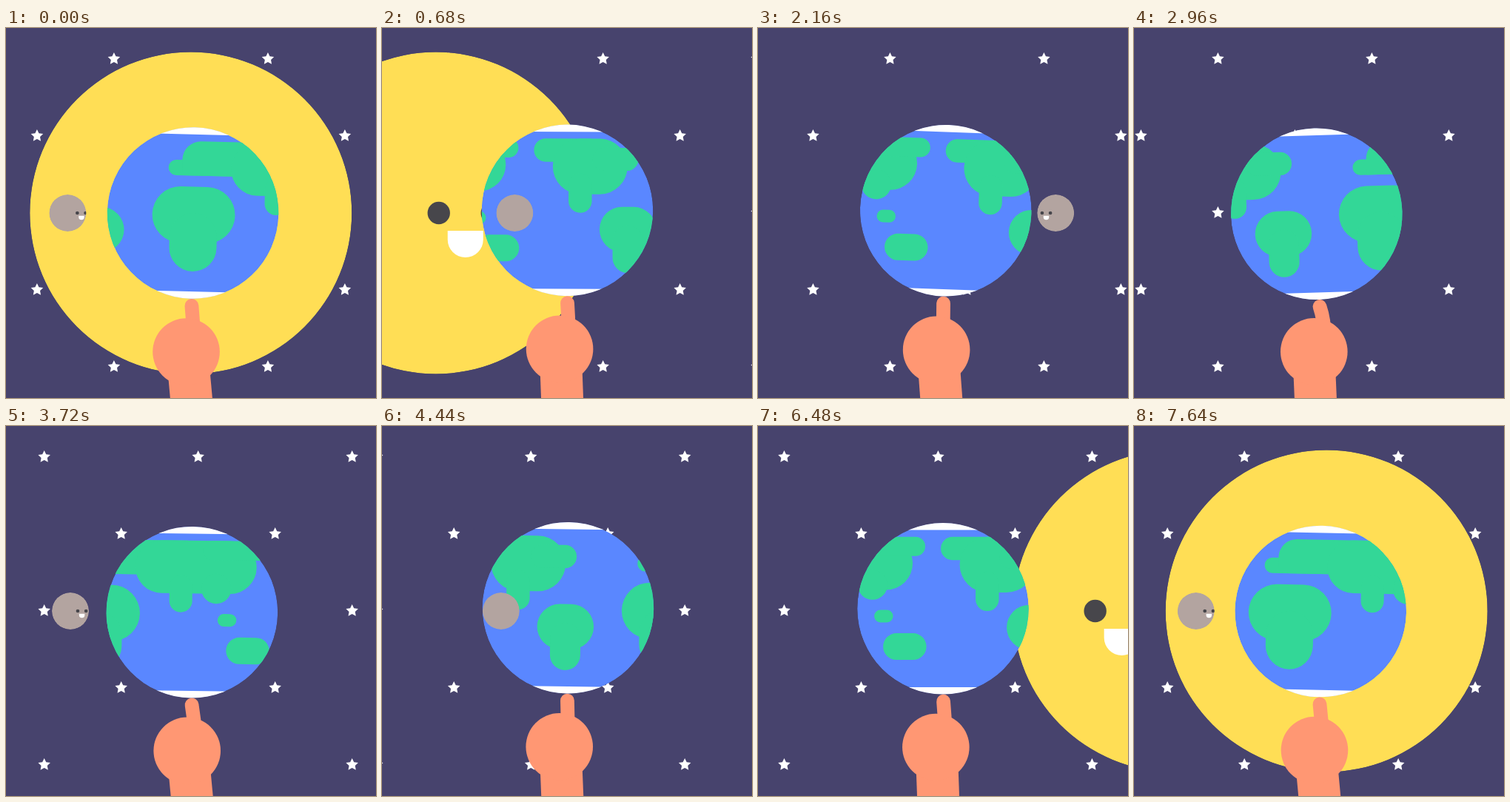
Recreate the animation shown at these times as an HTML page. Size 500 by 500 pixels, loop 7680 ms.

```html
<!DOCTYPE html>
<html lang="en">
<head>
<meta charset="utf-8">
<title>Spinning globe</title>
<style>
  html, body { margin: 0; width: 100%; height: 100%; overflow: hidden; background: #47436d; }
  svg { display: block; width: 100vw; height: 100vh; }
  .skin { fill: #ff9773; }
  .finger { fill: none; stroke: #ff9773; stroke-width: 18.8; stroke-linecap: round; }
</style>
</head>
<body>
<svg viewBox="0 0 500 500">
  <defs>
    <clipPath id="sunClip"><circle r="217.5"/></clipPath>
    <clipPath id="moonClip"><circle r="25"/></clipPath>
    <clipPath id="earthClip"><circle r="115.8"/></clipPath>

    <g id="face">
      <circle cx="-36" r="15.2" fill="#47464b"/>
      <circle cx="36" r="15.2" fill="#47464b"/>
      <path d="M-24 24h48v12a24 24 0 0 1-48 0z" fill="#fff"/>
    </g>

    <g id="land" fill="#33d797">
      <!-- Africa -->
      <rect x="-56" y="-35.5" width="112" height="76" rx="38"/>
      <rect x="-32" y="0" width="64" height="79" rx="32"/>
      <!-- South America -->
      <rect x="-170" y="-5" width="76.5" height="61" rx="30.5"/>
      <rect x="-152.2" y="20" width="41" height="64.3" rx="20.5"/>
      <!-- North America -->
      <rect x="-259" y="-97" width="90" height="31.4" rx="15.7"/>
      <rect x="-233.5" y="-97" width="101" height="75.2" rx="37.6"/>
      <rect x="-180" y="-84.8" width="62.3" height="31.2" rx="15.6"/>
      <rect x="-212" y="-50" width="31.5" height="53.3" rx="15.7"/>
      <!-- Eurasia -->
      <rect x="-35.5" y="-71.5" width="110" height="21" rx="10.5"/>
      <path d="M-17 -60V-72a25 25 0 0 1 25-25H120V-50.5H-17z"/>
      <rect x="49" y="-97" width="164" height="71.6" rx="35.8"/>
      <rect x="140" y="-97" width="90" height="26" rx="13"/>
      <rect x="95.5" y="-50" width="31" height="50.2" rx="15.5"/>
      <circle cx="158.8" cy="-32.2" r="20.2"/>
      <!-- Oceania -->
      <rect x="173" y="33.3" width="58.5" height="36" rx="18"/>
      <rect x="161" y="1.8" width="25.5" height="17" rx="8.5"/>
    </g>
  </defs>

  <rect width="500" height="500" fill="#47436d"/>
  <g id="stars" fill="#fff"></g>

  <g id="sun" clip-path="url(#sunClip)">
    <circle r="217.5" fill="#ffde55"/>
    <use id="sunFace" href="#face"/>
  </g>

  <g id="earth" clip-path="url(#earthClip)">
    <circle r="115.8" fill="#5a87ff"/>
    <g id="spin">
      <use href="#land"/>
      <use href="#land" x="-510"/>
    </g>
    <path d="M-120 -120h240v13.8h-240zM-120 106.2h240v13.8h-240z" fill="#fff"/>
  </g>

  <g id="moon" clip-path="url(#moonClip)">
    <circle r="25" fill="#b3a4a0"/>
    <use id="moonFace" href="#face"/>
  </g>

  <path id="arm" class="skin"/>
  <path id="finger" class="finger"/>
  <circle id="palm" class="skin" r="45.3"/>
</svg>

<script>
const LOOP = 7680, BOB = 1920, ORBIT = 3840, DAY = 480;
const LAND_WIDTH = 510, STAR_GAP = 208;
const $ = id => document.getElementById(id);
const [stars, sun, sunFace, earth, spin, moon, moonFace, arm, finger, palm] =
  ['stars', 'sun', 'sunFace', 'earth', 'spin', 'moon', 'moonFace', 'arm', 'finger', 'palm'].map($);

const place = (el, x, y, extra = '') =>
  el.setAttribute('transform', `translate(${x} ${y}) ${extra}`);

// Eased swing from -1 (at start) to 1 and back.
function swing(t, period, start) {
  const u = ((t - start + period) % period) / period * 2;
  const p = u < 1 ? u : 2 - u;
  return 2 * p * p * (3 - 2 * p) - 1;
}

function starPath(cx, cy) {
  const points = [];
  for (let i = 0; i < 10; i++) {
    const r = i % 2 ? 4.3 : 8.7, a = i * Math.PI / 5;
    points.push(`${cx + r * Math.sin(a)} ${cy - r * Math.cos(a)}`);
  }
  return `M${points.join('L')}z`;
}

function buildStars() {
  let d = '';
  for (let row = 0; row < 5; row++)
    for (let col = -1; col < 4; col++)
      d += starPath((row % 2 ? 42 : 146) + col * STAR_GAP, 41.7 + row * 104);
  stars.innerHTML = `<path d="${d}"/>`;
}

function drawSky(t) {
  place(stars, -(t / LOOP * 3 * STAR_GAP) % STAR_GAP, 0);
  let dx = -2000 * t / LOOP;
  if (dx < -500) dx += 2000;
  place(sun, 250 + dx, 250);
  place(sunFace, -0.226 * dx, 0);
}

function drawMoon(t) {
  const phase = t % ORBIT;
  place(moon, 250 + 166.67 * swing(phase, ORBIT, 0), 250);
  // The face always looks at the globe and crosses while behind it.
  let u = (phase - 2880) / 960;
  if (u < -2) u += 4;
  place(moonFace, 14.95 * u + 3.65 * u ** 3, 0, 'scale(.1556)');
  if (phase < ORBIT / 2) earth.after(moon);
  else earth.before(moon);
}

function drawEarth(t, bob, tilt) {
  place(earth, 250 + 3.75 * tilt, 250 + 4.7 * bob, `rotate(${2.05 * tilt})`);
  place(spin, (t % DAY) / DAY * LAND_WIDTH, 0);
}

function drawHand(bob, tilt) {
  const px = 243 + 3.9 * bob + 0.8 * tilt;
  const py = 437 + 4.35 * bob + 0.9 * tilt;
  place(palm, px, py);

  const top = 215.1 + 3.3 * bob + 1.9 * tilt;
  const low = 219 + 5.8 * bob + 4.2 * tilt;
  arm.setAttribute('d', `M${top} 440L${low} 500h57L${top + 57} 440z`);

  const tx = 250.9 + 0.5 * bob, ty = 375.3 + 4.6 * bob;
  const bx = 254.9 + 3.2 * bob - 1.2 * tilt, by = py - 22;
  const bend = 1.5 + bob - 2.2 * tilt;
  finger.setAttribute('d',
    `M${tx} ${ty}Q${(tx + bx) / 2 + bend} ${(ty + by) / 2} ${bx} ${by}`);
}

function draw() {
  const t = performance.now() % LOOP;
  const bob = swing(t, BOB, 480), tilt = swing(t, BOB, 1200);
  drawSky(t);
  drawMoon(t);
  drawEarth(t, bob, tilt);
  drawHand(bob, tilt);
  requestAnimationFrame(draw);
}

buildStars();
draw();
</script>
</body>
</html>
```
